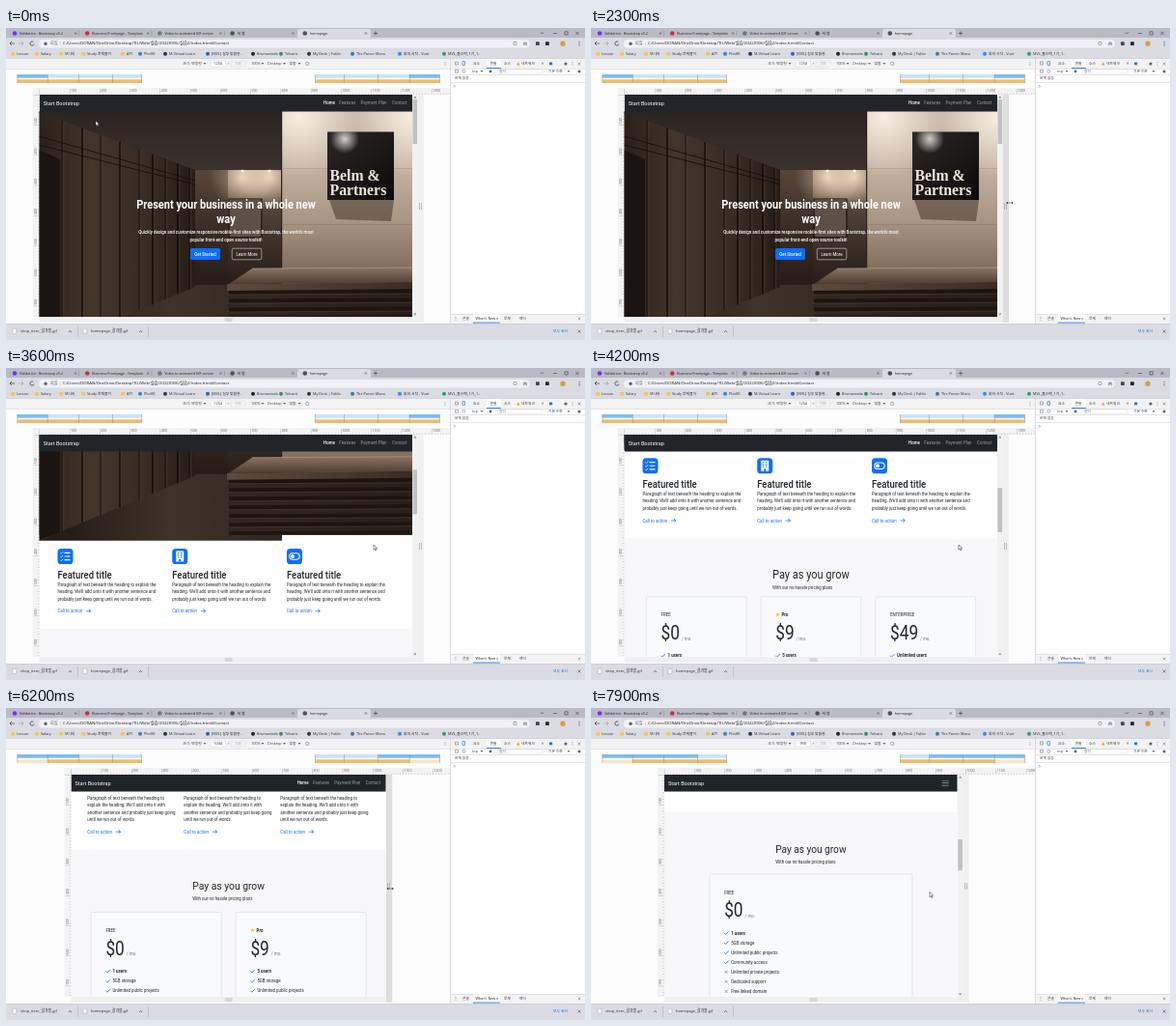
An HTML page with a canvas for the animation above (8 s loop, 600 by 323 pixels).

```html
<!DOCTYPE html>
<html lang="ko">
<head>
<meta charset="utf-8">
<title>homepage</title>
<style>
html, body { margin: 0; width: 600px; height: 323px; overflow: hidden; background: #fff }
canvas { display: block; width: 600px; height: 323px }
</style>
</head>
<body>
<canvas id="stage"></canvas>
<script>
const canvas = document.getElementById('stage'), ctx = canvas.getContext('2d');
const ratio = window.devicePixelRatio || 1;
canvas.width = 600 * ratio;
canvas.height = 323 * ratio;

const UI = '"Open Sans", "Noto Sans CJK KR", "Noto Sans CJK", sans-serif';
const PAGE = 'Roboto, "Noto Sans", sans-serif';
const SERIF = '"Liberation Serif", "Noto Serif", serif';
const CONDENSED = .88; // page typeface is a condensed cut
const SCALE = .3125, MID = 230.6, TOP = 69, BOTTOM = 299;
const BLUE = '#0d6efd', INK = '#212529', GREY = '#5f6368', PALE = '#f3f3f4';
const STRIP = '#b9bac5', BAR = '#dadbe3';

// ---- drawing helpers ----
function box(x, y, w, h, color, r = 0) {
  ctx.fillStyle = color;
  ctx.beginPath();
  ctx.roundRect(x, y, w, h, r);
  ctx.fill();
}
function outline(x, y, w, h, color, r = 0, lw = .5) {
  ctx.strokeStyle = color;
  ctx.lineWidth = lw;
  ctx.beginPath();
  ctx.roundRect(x, y, w, h, r);
  ctx.stroke();
}
function trace(pts) {
  ctx.beginPath();
  pts.forEach(p => ctx.lineTo(...p));
}
function line(pts, color, lw = .6) {
  ctx.strokeStyle = color;
  ctx.lineWidth = lw;
  trace(pts);
  ctx.stroke();
}
function poly(pts, color) {
  ctx.fillStyle = color;
  trace(pts);
  ctx.fill();
}
function dot(x, y, r, color) {
  ctx.fillStyle = color;
  ctx.beginPath();
  ctx.arc(x, y, r, 0, 7);
  ctx.fill();
}
function text(s, x, y, size, color, { font = UI, weight = 400, align = 'left', squeeze = 1 } = {}) {
  ctx.save();
  ctx.translate(x, y);
  ctx.scale(squeeze, 1);
  ctx.font = `${weight} ${size}px ${font}`;
  ctx.textAlign = align;
  ctx.textBaseline = 'middle';
  ctx.fillStyle = color;
  ctx.fillText(s, 0, size * .04);
  const width = ctx.measureText(s).width * squeeze;
  ctx.restore();
  return width;
}
const copy = (s, x, y, size, color = INK, weight = 400, align = 'left') =>
  text(s, x, y, size, color, { font: PAGE, weight, align, squeeze: CONDENSED });
function fade(x0, y0, x1, y1, ...colors) {
  const g = ctx.createLinearGradient(x0, y0, x1, y1);
  colors.forEach((c, i) => g.addColorStop(i / (colors.length - 1), c));
  return g;
}
function glow(x, y, r, rgb, alpha, area) {
  const g = ctx.createRadialGradient(x, y, 0, x, y, r);
  g.addColorStop(0, `rgba(${rgb},${alpha})`);
  g.addColorStop(1, `rgba(${rgb},0)`);
  box(...area, g);
}
function cross(x, y, r, color = GREY, lw = .5) {
  line([[x - r, y - r], [x + r, y + r]], color, lw);
  line([[x + r, y - r], [x - r, y + r]], color, lw);
}
const caret = (x, y, color = GREY) => poly([[x - 1.4, y - .9], [x + 1.4, y - .9], [x, y + 1.1]], color);
const check = (x, y, color, k = 1) =>
  line([[x, y], [x + 1.5 * k, y + 1.5 * k], [x + 4.5 * k, y - 1.7 * k]], color, .8);

// ---- motion ----
function tween(t, keys) {
  const i = keys.findIndex(k => k[0] > t);
  if (i < 0) return keys.at(-1).slice(1);
  const a = keys[i - 1], b = keys[i], p = (t - a[0]) / (b[0] - a[0]), u = p * p * (3 - 2 * p);
  return a.slice(1).map((v, j) => v + (b[j + 1] - v) * u);
}
const WIDTH = [[0, 1254], [5100, 1254], [6200, 1044], [6500, 990]];
const SCROLL = [[0, 0], [2900, 0], [3600, 156.25], [3800, 156.25], [4200, 250],
  [7100, 250], [7500, 375], [7600, 375], [7900, 450]];
const POINTER = [[0, 93, 96], [1200, 93, 96], [2100, 434, 181], [2500, 434, 181], [2800, 381, 183],
  [4200, 381, 183], [4800, 431, 186], [5100, 431, 186], [6200, 398.2, 187], [6500, 389.8, 187],
  [6600, 389.8, 187], [7000, 351, 190.5]];

// ---- browser frame ----
const TABS = [['Validation · Bootstrap v5.2', '#7d2af0'], ['Business Frontpage - Template', '#c8323c'],
  ['Video to animated GIF conver', '#6b7785'], ['새 탭', '#4c5158'], ['homepage', '#4c5158']];
const FOLDER = '#f4c84f';
const BOOKMARKS = [[5, 'Lesson', FOLDER], [30, 'Salary', FOLDER], [55, '모나비', FOLDER],
  [78, 'Study 문제풀이', FOLDER], [119, 'API', FOLDER], [137, 'PlotKK', '#3d7fd0'],
  [163, 'M-Virtual Learn', '#26364f'], [207, '[MVL] 실무 맞춤형..', '#2d5fc4'], [254, 'Brumwenda', '#222'],
  [283, 'Tolvaric', '#3a8f5c'], [312, 'My Desk | Fablo', '#333'], [357, 'The Parser Manu', '#3b76ab'],
  [406, '회의 시작 - Vunt', '#2d8cff'], [452, 'MVL_풀스택_1기_1..', '#23a566']];

function drawBrowser() {
  box(0, 0, 600, 10.5, STRIP);
  box(302, 1, 76, 10, BAR, [2.5, 2.5, 0, 0]);
  TABS.forEach(([label, color], i) => {
    const x = 9 + i * 75.2;
    dot(x, 5.5, 2.3, color);
    text(label, x + 5, 5.5, 3.7, '#222');
    cross(x + 63, 5.5, 1.1, '#333');
    if (i < 3) box(x + 66.5, 3, .5, 5, '#85868f');
  });
  line([[381, 5.5], [385, 5.5]], '#333');
  line([[383, 3.5], [383, 7.5]], '#333');
  line([[554, 4.5], [555.5, 6], [557, 4.5]], '#333');
  line([[567, 5.5], [571, 5.5]], '#222', .5);
  outline(579, 3.8, 3.2, 3.2, '#222');
  cross(592, 5.5, 1.7, '#222');

  box(0, 10.5, 600, 21, BAR);
  line([[9, 16], [4, 16], [6, 14], [4, 16], [6, 18]], '#333');
  line([[13, 16], [18, 16], [16, 14], [18, 16], [16, 18]], '#9a9ca3');
  ctx.lineWidth = .7;
  ctx.strokeStyle = '#333';
  ctx.beginPath();
  ctx.arc(27, 16, 2.1, .3, 5.4);
  ctx.stroke();
  box(34, 12, 509, 8.6, '#f1f1f5', 4.3);
  dot(41, 16.2, 1.7, GREY);
  text('파일', 46, 16.2, 4.2, GREY);
  box(56, 14, .4, 4.4, '#c0c3c7');
  text('C:/Users/DORAN/OneDrive/Desktop/TIL/Web/실습/20220906/실습2/index.html#Contact', 59, 16.2, 4.25, '#202124');
  outline(526, 14.5, 3, 3, GREY, .5);
  line([[536, 18], [538, 14.2], [540, 18], [536, 15.6], [540, 15.6], [536, 18]], GREY, .4);
  box(549, 14.2, 3.8, 3.8, '#444', .7);
  box(559, 14.2, 3.8, 3.8, '#222', .7);
  dot(577, 16.2, 2.6, '#d99a3d');
  [14.3, 16.2, 18.1].forEach(y => dot(594, y, .5, '#333'));

  BOOKMARKS.forEach(([x, label, color]) => {
    color === FOLDER ? box(x, 25, 4.2, 3.4, color, .5) : dot(x + 2, 26.7, 2, color);
    text(label, x + 6, 26.8, 3.8, '#2b2d31');
  });
  box(0, 31.2, 600, .5, '#c3c4cb');

  // downloads
  box(0, 306, 600, 17, BAR);
  box(0, 306, 600, .5, '#c3c4cb');
  [['shop_item_결과물.gif', 7], ['homepage_결과물.gif', 80]].forEach(([name, x]) => {
    box(x, 311.3, 3.8, 5, '#fff', .4);
    outline(x, 311.3, 3.8, 5, '#8a9199', .4, .4);
    text(name, x + 8, 314, 4, '#333');
    line([[x + 58, 315], [x + 59.5, 313.3], [x + 61, 315]], '#333');
    box(x + 67, 309, .5, 11, '#a9abb3');
  });
  text('모두 표시', 567, 314, 3.8, '#1a73e8');
  cross(594, 314, 1.5, '#333');
}

function drawDevtools() {
  box(461, 31.7, 139, 274.3, '#fff');
  box(461, 31.7, 139, 10.3, PALE);
  outline(465.5, 35, 3, 3, GREY);
  outline(473, 34.5, 2.5, 4, '#1a73e8', .5, .7);
  text('요소', 484, 37, 3.8, '#444');
  box(498, 32, 15, 9.7, '#fff');
  text('콘솔', 501.5, 37, 3.8, '#222');
  box(498, 41, 15, .9, '#1a73e8');
  text('소스', 516, 37, 3.8, '#444');
  poly([[529, 38.4], [532.6, 38.4], [530.8, 35.2]], '#e8a600');
  text('네트워크', 534, 37, 3.8, '#444');
  text('»', 555, 36.6, 4.5, '#444');
  box(563, 35.5, 3.2, 2.8, '#1a73e8', .5);
  dot(580, 37, 1.6, GREY);
  [35.4, 37, 38.6].forEach(y => dot(587, y, .45, GREY));
  cross(594, 37, 1.4);
  box(461, 42, 139, .4, '#cbcdd1');
  outline(465.5, 43.3, 3, 3, GREY);
  outline(473, 43.3, 3, 3, GREY, 1.5);
  text('top', 483, 44.9, 3.8, '#444');
  caret(493, 45);
  dot(502, 45, 1.4, GREY);
  outline(509, 42.9, 47, 4.2, '#c7cacf', .5, .4);
  text('필터', 511, 45, 3.7, '#777');
  text('기본 수준', 562, 45, 3.7, '#444');
  caret(583, 45);
  dot(594, 45, 1.5, GREY);
  box(461, 48, 139, .4, '#cbcdd1');
  text('문제 없음', 465, 52, 3.7, '#444');
  box(461, 56, 139, .4, '#cbcdd1');
  line([[464, 59], [465.3, 60.3], [464, 61.6]], '#367cf1', .7);
  box(461, 296, 139, 10, PALE);
  box(461, 296, 139, .4, '#cbcdd1');
  [299.2, 300.8, 302.4].forEach(y => dot(466, y, .45, GREY));
  text('콘솔', 473, 301, 3.8, '#444');
  box(484, 296.4, 28, 9, '#fff');
  text("What's New", 486.5, 301, 3.8, '#222');
  cross(509, 301, .9);
  box(484, 304.6, 28, .9, '#1a73e8');
  text('문제', 516, 301, 3.8, '#444');
  text('렌더', 532, 301, 3.8, '#444');
  cross(594, 301, 1.3);
}

const BREAKS = [576, 768, 992, 1200, 1400];

function drawDevice(width, left, right, hover) {
  box(0, 31.7, 460.5, 10.3, PALE);
  text('크기: 반응형', 183, 37, 3.9, '#444');
  caret(206, 37);
  box(212, 34, 15.5, 6, '#fff');
  outline(212, 34, 15.5, 6, '#c9ccd0', .5, .4);
  text(Math.round(width), 219.7, 37, 3.8, '#222', { align: 'center' });
  text('×', 230.3, 37, 4, '#777', { align: 'center' });
  outline(233, 34, 15, 6, '#d5d7da', .5, .4);
  text('735', 240.5, 37, 3.8, '#999', { align: 'center' });
  [['100%', 254, 266], ['Desktop', 271, 288.5], ['맞춤', 293.5, 304]].forEach(([s, x, end]) => {
    text(s, x, 37, 3.8, '#444');
    caret(end, 37);
  });
  outline(310.7, 35.4, 3, 3, GREY, .8);
  [35.4, 37, 38.6].forEach(y => dot(455, y, .45, GREY));
  box(0, 42, 460.5, .4, '#cbcdd1');

  // breakpoint bars, mirrored around the centre
  for (const side of [-1, 1]) {
    for (let i = 1; i < BREAKS.length; i++) {
      const a = MID + side * BREAKS[i - 1] * SCALE / 2, b = MID + side * BREAKS[i] * SCALE / 2;
      const x = Math.min(a, b), w = Math.abs(a - b);
      box(x, 48, w, 3.8, BREAKS[i] > width ? '#7fbdf0' : '#c9e4fa');
      box(x, 53.3, w, 3.8, BREAKS[i - 1] - 2 <= width ? '#f0bd6c' : '#fae6c6');
    }
    BREAKS.forEach(b => box(MID + side * b * SCALE / 2 - .2, 48, .5, 9, '#8d857a'));
  }

  // rulers
  box(left - 7, 62, 467.5 - left, 7, PALE);
  box(left - 7, 62, 7, 237, PALE);
  for (let n = 0; left + n * 3.125 < 460; n++) {
    const x = left + n * 3.125, big = n % 10 === 0;
    box(x, big ? 63 : 67.4, .4, big ? 6 : 1.6, '#a3a6aa');
    if (big && n && x < 452) text(n * 10, x + 1, 65.3, 3.6, '#666');
  }
  for (let n = 0; n < 74; n++) {
    const y = TOP + n * 3.125, big = n % 10 === 0;
    box(left - (big ? 6 : 1.6), y, big ? 6 : 1.6, .4, '#a3a6aa');
    if (!big || !n) continue;
    ctx.save();
    ctx.translate(left - 3.8, y - 1);
    ctx.rotate(-Math.PI / 2);
    text(n * 10, 0, 0, 3.6, '#666');
    ctx.restore();
  }

  // resize handles
  box(right, TOP, 6.5, 236, hover ? '#dedee0' : '#f0f0f1');
  box(left, BOTTOM, right - left, 6, '#f0f0f1');
  [-1, 1].forEach(d => {
    box(right + 3 + d - .3, 181, .6, 7, '#999');
    box(MID - 4, 302 + d - .3, 8, .6, '#999');
  });
}

// ---- web page ----
function drawHero() {
  // corridor, ceiling and floor
  box(34, 86, 388, 243, '#211a16');
  box(196, 147, 90, 124, fade(0, 147, 0, 271, '#6f5d4d', '#44372d', '#241b16'));
  for (const x of [245, 273]) glow(x, 154, 34, '255,232,205', .85, [196, 147, 90, 60]);
  box(196, 147, 34, 124, 'rgba(40,28,20,.35)');
  poly([[34, 86], [286, 86], [286, 147], [196, 147], [34, 88]], fade(0, 86, 0, 147, '#2a2420', '#3c332d'));
  for (const x of [245, 273]) dot(x, 148, 1.5, '#fff6e6');
  outline(231, 177, 34, 40, '#1d1612', 0, 1.2);
  box(232, 178, 32, 38, '#5d5044');
  poly([[34, 335], [196, 266], [286, 266], [286, 335]], fade(60, 0, 286, 0, '#251c16', '#40332a', '#30261f'));

  // panelled wall
  poly([[34, 87], [196, 147], [196, 268], [34, 335]], fade(34, 0, 196, 0, '#2b201a', '#44352b', '#3a2d24', '#281d17'));
  const rise = (x, a, b) => a + (b - a) * (x - 34) / 162;
  [58, 79, 98, 118, 138, 152, 165, 178, 190].forEach((x, i) => {
    line([[x, rise(x, 87, 147)], [x, rise(x, 335, 268)]], '#120c09', i % 2 ? 1.5 : .8);
    line([[x + 1.8, rise(x, 87, 147) + 1], [x + 1.8, rise(x, 335, 268)]], '#5f4c3e', .4);
  });
  [[112, 158], [121, 162]].forEach(([a, b]) => line([[34, a], [196, b]], '#150e0a', .9));
  poly([[34, 126], [56, 136], [56, 326], [34, 335]], '#1c1410');

  // lit stone wall with the sign
  box(286, 86, 136, 243, fade(0, 86, 0, 255, '#c9b8a5', '#c4b2a0', '#a89583', '#7d6a5a'));
  for (const x of [304, 421]) glow(x, 92, 62, '255,248,236', .85, [286, 86, 136, 90]);
  box(285, 86, 1.2, 180, '#2a211b');
  [145, 203].forEach(y => box(287, y, 135, .5, 'rgba(80,65,52,.3)'));
  poly([[335, 178], [402, 178], [399, 200], [342, 198]], 'rgba(60,46,36,.5)');
  box(333, 107.5, 69, 70.5, fade(333, 107, 402, 178, '#2b2826', '#0d0b0a'));
  glow(351, 115, 15, '255,250,240', .8, [333, 107.5, 69, 70.5]);
  text('Belm &', 335.5, 153, 15.8, '#ece6da', { font: SERIF, weight: 700 });
  text('Partners', 335.5, 168.5, 15.8, '#ece6da', { font: SERIF, weight: 700 });

  // reception desk
  box(231, 266, 191, 63, '#1d1511');
  poly([[255, 249], [422, 248], [422, 263], [231, 265]], fade(0, 248, 0, 265, '#8b7562', '#4d3d32'));
  line([[255, 249], [422, 248]], '#b7a08a', .6);
  poly([[229, 265], [422, 263], [422, 270], [229, 272]], fade(229, 0, 422, 0, '#5e4a3b', '#3a2c23'));
  for (let i = 0; i < 6; i++) {
    const y = 276 + i * 9;
    poly([[229, y], [422, y - 1], [422, y + 3.5], [231, y + 4.5]], fade(229, 0, 422, 0, '#34271f', '#2a1f18'));
    line([[229, y], [422, y - 1]], '#594637', .5);
  }

  copy('Present your business in a whole new', 228, 183, 12.5, '#fff', 700, 'center');
  copy('way', 228, 198, 12.5, '#fff', 700, 'center');
  copy("Quickly design and customize responsive mobile-first sites with Bootstrap, the world's most", 228, 211.5, 5.05, '#fff', 500, 'center');
  copy('popular front-end open source toolkit!', 228, 219, 5.05, '#fff', 500, 'center');
  box(191, 228, 31, 12, BLUE, 1.7);
  copy('Get Started', 206.5, 234, 5, '#fff', 500, 'center');
  outline(234.2, 228.2, 30.6, 11.6, '#f8f9fa', 1.7);
  copy('Learn More', 249.5, 234, 5, '#fff', 400, 'center');
}

const LAYOUTS = {
  wide: { box: 356.25, features: 3, cards: 3, title: 10.8, cardTop: 60.5, margin: 0, lines: [
    'Paragraph of text beneath the heading to explain the',
    "heading. We'll add onto it with another sentence and",
    'probably just keep going until we run out of words.'] },
  middle: { box: 300, features: 3, cards: 2, title: 9.8, cardTop: 65, margin: 0, lines: [
    'Paragraph of text beneath the heading to',
    "explain the heading. We'll add onto it with",
    'another sentence and probably just keep going',
    'until we run out of words.'] },
  narrow: { box: 225, features: 1, cards: 1, title: 9.5, cardTop: 64, margin: 15, lines: [
    "Paragraph of text beneath the heading to explain the heading. We'll add onto it with another sentence and",
    'probably just keep going until we run out of words.'] }
};

const ICONS = [
  (x, y) => [4.3, 8, 11.7].forEach(d => {
    box(x + 7, y + d - .6, 6, 1.2, '#fff', .5);
    check(x + 2.8, y + d, '#fff', .65);
  }),
  (x, y) => {
    box(x + 4, y + 2.5, 8, 11, '#fff', .6);
    for (let i = 0; i < 6; i++) box(x + 5.6 + i % 2 * 3.2, y + 4 + (i >> 1) * 2.2, 1.4, 1.2, BLUE);
    box(x + 7, y + 11, 2, 2.5, BLUE);
  },
  (x, y) => {
    outline(x + 2.8, y + 4.8, 10.4, 6.4, '#fff', 3.2, 1.1);
    dot(x + 6, y + 8, 2, '#fff');
  }
];

function drawFeature(i, x, y, { lines, title }) {
  box(x, y, 16, 16, BLUE, 3.6);
  ICONS[i](x, y);
  copy('Featured title', x, y + 27, title, INK, 500);
  lines.forEach((s, n) => copy(s, x, y + 37 + n * 7.5, 5));
  const end = y + 42.2 + lines.length * 7.5;
  const ax = x + 4 + copy('Call to action', x, end, 5, BLUE);
  line([[ax, end], [ax + 4.6, end], [ax + 2.8, end - 1.8], [ax + 4.6, end], [ax + 2.8, end + 1.8]], BLUE, .7);
}

const PLANS = [['FREE', '$0', '1 users'], ['Pro', '$9', '5 users'], ['ENTERPRISE', '$49', 'Unlimited users']];
const PERKS = ['5GB storage', 'Unlimited public projects', 'Community access',
  'Unlimited private projects', 'Dedicated support', 'Free linked domain'];

function drawStar(x, y) {
  const pts = Array.from({ length: 10 }, (_, i) => {
    const r = i % 2 ? 1 : 2.4, a = i * Math.PI / 5;
    return [x + r * Math.sin(a), y - r * Math.cos(a)];
  });
  poly(pts, '#ffc107');
}

function drawPlan([name, price, users], x, y, w) {
  box(x, y, w, 170, '#f9fafb', 1.2);
  outline(x, y, w, 170, '#d3d5d8', 1.2);
  const left = x + 15.2, pro = name === 'Pro';
  if (pro) drawStar(left + 2.2, y + 18.6);
  copy(name, left + (pro ? 6.2 : 0), y + 19, 5, INK, pro ? 700 : 400);
  const end = left + copy(price, left, y + 38, 19.6);
  copy('/ mo.', end + 2, y + 43.3, 5, '#6c757d');
  [users, ...PERKS].forEach((s, i) => {
    const row = y + 61 + i * 10.1;
    i < 4 ? check(left, row, BLUE) : cross(left + 2, row, 1.4, '#6c757d', .7);
    copy(s, left + 7, row, 5, INK, i ? 400 : 700);
  });
}

function drawNav(width, left, right) {
  box(left, TOP, right - left, 17.4, INK);
  copy('Start Bootstrap', left + 4, 77.7, 6.25, '#fff');
  if (width < 992) {
    [75.2, 77.6, 80].forEach(y => box(right - 16, y - .3, 7, .7, '#a5a7a9'));
    return;
  }
  copy('Home', right - 92, 77.6, 5, '#fff', 500);
  [['Features', 75.7], ['Payment Plan', 53.5], ['Contact', 21]].forEach(([s, dx]) =>
    copy(s, right - dx, 77.6, 5, '#9b9d9f'));
}

function drawPage(width, left, right, scroll) {
  const mode = width >= 1200 ? 'wide' : width >= 992 ? 'middle' : 'narrow';
  const layout = LAYOUTS[mode], centre = (left + right) / 2, edge = centre - layout.box / 2;
  const top = 343.25 - scroll - (mode === 'wide' ? 0 : 37.25);
  const pitch = 65.7 + layout.lines.length * 7.5;
  const rows = 3 / layout.features;

  ctx.save();
  ctx.beginPath();
  ctx.rect(left, TOP, right - left, BOTTOM - TOP);
  ctx.clip();
  box(left, TOP, right - left, 230, '#fff');
  if (mode === 'wide') {
    ctx.save();
    ctx.translate(0, -scroll);
    drawHero();
    ctx.restore();
  }
  for (let i = 0; i < 3; i++) {
    const col = i % layout.features, row = Math.floor(i / layout.features);
    drawFeature(i, edge + 3.75 + col * layout.box / 3, top + row * pitch, layout);
  }

  const end = top + (rows - 1) * pitch + 60.5 + layout.lines.length * 7.5 + layout.margin;
  box(left, end, right - left, 400, '#f8f8fb');
  const size = Math.min(40, 22 + .015 * width) * SCALE;
  const half = copy('Pay as you grow', centre, end + 38, size, INK, 400, 'center') / 2;
  copy('With our no hassle pricing plans', centre - half, end + 51, 5);
  const col = layout.box / layout.cards;
  for (let i = 0; i < layout.cards; i++)
    drawPlan(PLANS[i], edge + 7.6 + i * col, end + layout.cardTop, col - 15);
  drawNav(width, left, right);
  ctx.restore();
  return mode;
}

function drawScrollbar(x, mode, scroll) {
  box(x, TOP, 5.5, 230, '#f1f1f1');
  poly([[x + 1.4, 72.4], [x + 4.2, 72.4], [x + 2.8, 70.6]], '#777');
  caret(x + 2.8, 296.5, '#777');
  if (mode === 'wide') box(x + .5, 74 + scroll * .2, 4.6, 46, '#c1c1c1');
  else box(x + .5, 108 + (scroll - 250) * .14, 4.6, 32, '#c1c1c1');
}

function drawPointer(x, y, resize) {
  if (resize) {
    line([[x - 3, y], [x + 3, y]], '#333', .6);
    for (const d of [-1, 1]) poly([[x + d * 3.6, y], [x + d * 2, y - 1.3], [x + d * 2, y + 1.3]], '#333');
    return;
  }
  const shape = [[0, 0], [0, 5.2], [1.2, 4.1], [2.1, 6], [2.9, 5.6], [2, 3.8], [3.6, 3.7], [0, 0]]
    .map(([dx, dy]) => [x + dx, y + dy]);
  poly(shape, '#fff');
  line(shape, '#222', .5);
}

function draw(t) {
  const [width] = tween(t, WIDTH), [scroll] = tween(t, SCROLL), [px, py] = tween(t, POINTER);
  const left = MID - width * SCALE / 2, right = MID + width * SCALE / 2;
  const dragging = width > 990 && width < 1254, hover = px >= right;
  const inner = right - (dragging ? 0 : 5.5);
  ctx.setTransform(ratio, 0, 0, ratio, 0, 0);
  box(0, 0, 600, 323, '#fdfdfd');
  drawDevice(width, left, right, hover);
  const mode = drawPage(width, left, inner, scroll);
  if (!dragging) drawScrollbar(inner, mode, scroll);
  drawDevtools();
  box(460.3, 31.5, .6, 274.5, '#c5c8cc');
  drawBrowser();
  drawPointer(px, py, hover);
}

const start = performance.now();
function tick() {
  const t = (performance.now() - start) % 8000;
  draw(Math.floor(t / 100) * 100);
  requestAnimationFrame(tick);
}
tick();
</script>
</body>
</html>
```
